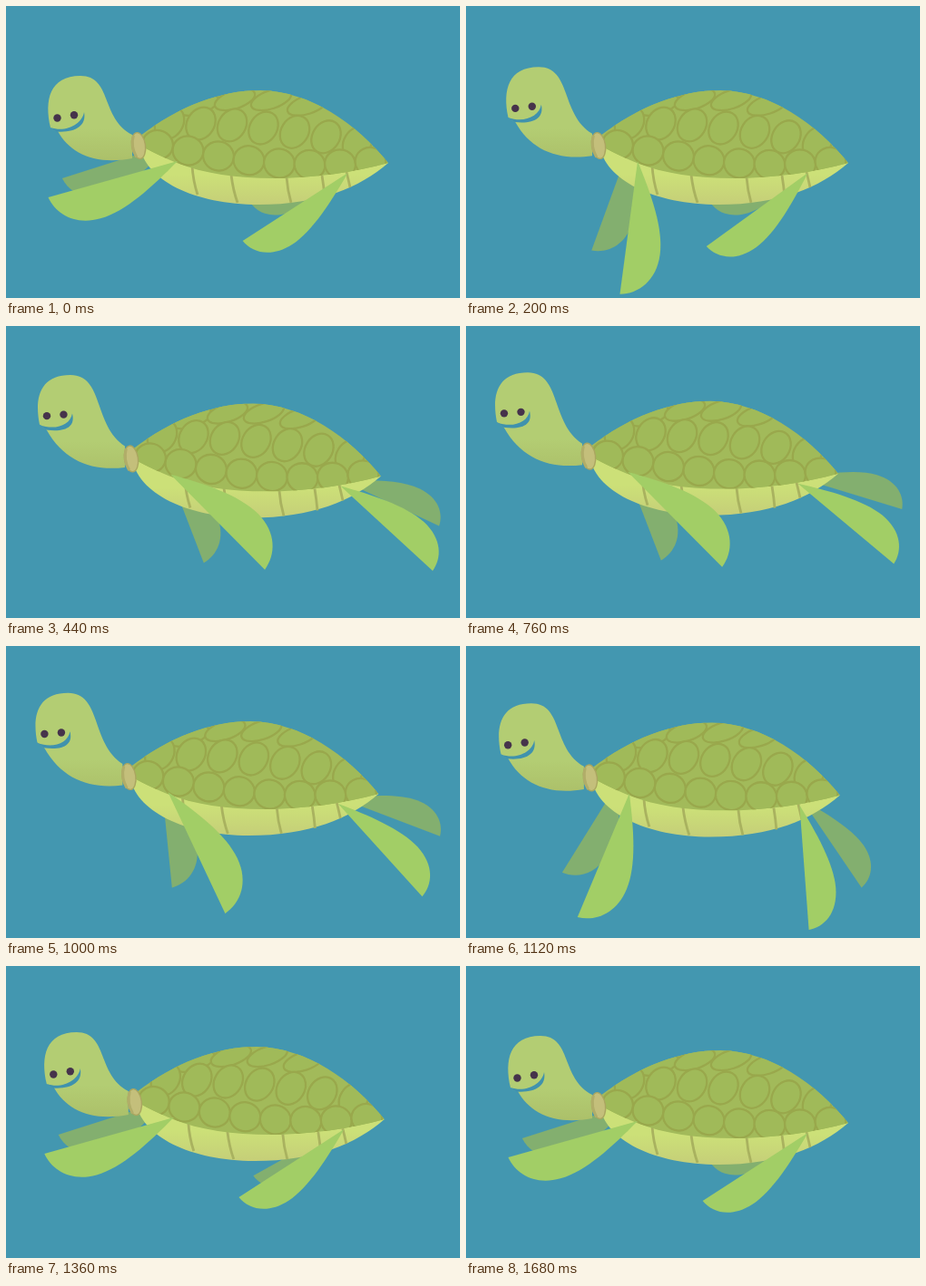
Recreate the animation shown at these times as an HTML page. Size 500 by 322 pixels, loop 1720 ms.

```html
<!DOCTYPE html>
<html lang="en">
<head>
<meta charset="utf-8">
<title>Swimming turtle</title>
<style>
  html, body { margin: 0; width: 100%; height: 100%; overflow: hidden; background: #4397b0; }
  svg { display: block; width: 100vw; height: 100vh; }
</style>
</head>
<body>
<svg viewBox="0 0 500 322">
  <defs>
    <linearGradient id="skin" gradientUnits="userSpaceOnUse" x1="0" y1="135" x2="0" y2="176">
      <stop offset="0" stop-color="#b3cd73"/>
      <stop offset="1" stop-color="#abbe68"/>
    </linearGradient>
    <linearGradient id="under" gradientUnits="userSpaceOnUse" x1="0" y1="186" x2="0" y2="220">
      <stop offset="0" stop-color="#cce078"/>
      <stop offset="1" stop-color="#c5ce78"/>
    </linearGradient>
    <path id="front" d="M0 0H148C145 20 128 38 99 38C70 38 35 20 0 0Z"/>
    <path id="rear" d="M0 0H138C136 17 122 33 94 33C68 33 31 16 0 0Z"/>
    <path id="dome" d="M148 143C190 111 236 93 280 93C336 94 386 130 421 173C350 193 250 198 188 173C172 166 158 160 147 153Z"/>
    <clipPath id="inDome"><use href="#dome"/></clipPath>
  </defs>
  <g id="turtle">
    <g fill="#83af6f">
      <use id="farFront" href="#front"/>
      <use id="farRear" href="#rear"/>
    </g>
    <path id="head" fill="url(#skin)"/>
    <path id="mouth" fill="#4092ad"/>
    <g fill="#46334b">
      <circle id="eyeL" r="4.2"/>
      <circle id="eyeR" r="4.2"/>
    </g>
    <path fill="url(#under)" d="M147 153C152 192 208 219 278 219C345 219 390 200 421 173L300 160Z"/>
    <path fill="none" stroke="#a9b25f" stroke-width="2.8"
      d="M205 176Q206 193 211 208M248 186Q250 203 255 217M309 189Q310 203 314 217M348 187Q350 199 351 211M375 183Q377 191 379 200"/>
    <use href="#dome" fill="#a2ba5a"/>
    <g id="plates" clip-path="url(#inDome)" fill="#a0ba59" stroke="#99a84c" stroke-width="2.3"/>
    <g transform="rotate(-8 146 154)">
      <ellipse cx="146" cy="154" rx="7.5" ry="14.5" fill="#c4bf7b" stroke="#aaa660" stroke-width="1.4"/>
      <path d="M142 142Q137 154 142 166" fill="none" stroke="#b1ad69" stroke-width="3"/>
    </g>
    <g fill="#a2ce66">
      <use id="nearFront" href="#front"/>
      <use id="nearRear" href="#rear"/>
    </g>
  </g>
</svg>
<script>
const STEP = 40, LOOP = 1720;
const $ = id => document.getElementById(id);

// Three rows of shell plates that follow the curve of the dome
function row(count, x, gap, yAt, rx, ry, tilt) {
  let out = '';
  for (let i = 0; i < count; i++) {
    const y = yAt(i / (count - 1));
    out += `<ellipse rx="${rx}" ry="${ry}" transform="translate(${x + i * gap} ${y}) rotate(${tilt})"/>`;
  }
  return out;
}
$('plates').innerHTML =
  row(4, 212, 40, u => 109 - 26 * u * (1 - u), 23, 10, -18) +
  row(7, 180, 34.5, u => 129 + 22 * u * u, 15, 19, 32) +
  row(8, 167, 33.5, u => 153 + 22 * Math.sin(2.1 * u), 17, 16, 15);

function ease(t, from, to) {
  const u = Math.min(1, Math.max(0, (t - from) / (to - from)));
  return u * u * (3 - 2 * u);
}

// Goes from 0 to 1 and later back to 0
const swing = (outFrom, outTo, backFrom, backTo) =>
  t => ease(t, outFrom, outTo) - ease(t, backFrom, backTo);

const drift = swing(227, 550, 920, 1680);
const lift = swing(0, 340, 980, 1210);
const frontStroke = swing(0, 370, 893, 1310);

// Pivot, scale, and the angles at both ends of the stroke
const flippers = [
  { id: 'nearFront', x: 189, y: 171, s: 1, a: 164.3, b: 45.3, stroke: frontStroke },
  { id: 'farFront', x: 181, y: 152, s: .845, a: 162.3, b: 69, stroke: frontStroke },
  { id: 'nearRear', x: 376.5, y: 184, s: 1, a: 147.1, b: 40, stroke: swing(170, 468, 930, 1351) },
  { id: 'farRear', x: 379, y: 178, s: .85, a: 163, b: 17, stroke: swing(216, 478, 952, 1448) }
];

// Blends two path strings that share one structure
function morph(a, b) {
  const to = b.match(/[\d.]+/g);
  return k => {
    let i = 0;
    return a.replace(/[\d.]+/g, v => (+v + (to[i++] - v) * k).toFixed(2));
  };
}
const headPath = morph(
  'M49 134C42 104 48 77 82 77C117 77 104 124 139 142L139 168C98 176 70 162 57 138Z',
  'M45 116C39 86 46 61.5 79 61.5C116 61.5 104 117 139 140L139 163.5C102 168 72 156 53 122.5Z');
const mouthPath = morph(
  'M49 134C66 140 84 130 86 117C89 132 76 140 56 138.5Z',
  'M45 116.5C62 123 79 117 81 104C85 119 73 125 52 122Z');
const eyeL = morph('56.5 123.5', '53 106.7');
const eyeR = morph('75 120.2', '71.5 105.2');

function draw(t) {
  const d = 11 * drift(t), k = lift(t);
  $('turtle').setAttribute('transform', `translate(${-d} ${-.94 * d})`);
  $('head').setAttribute('d', headPath(k));
  $('mouth').setAttribute('d', mouthPath(k));
  $('eyeL').setAttribute('transform', `translate(${eyeL(k)})`);
  $('eyeR').setAttribute('transform', `translate(${eyeR(k)})`);
  for (const { id, x, y, s, a, b, stroke } of flippers) {
    const angle = a + (b - a) * stroke(t);
    $(id).setAttribute('transform', `translate(${x} ${y}) rotate(${angle}) scale(${s} ${-s})`);
  }
}

const start = performance.now();
function tick() {
  const t = (performance.now() - start) % LOOP;
  draw(Math.floor(t / STEP) * STEP);
  requestAnimationFrame(tick);
}
tick();
</script>
</body>
</html>
```
